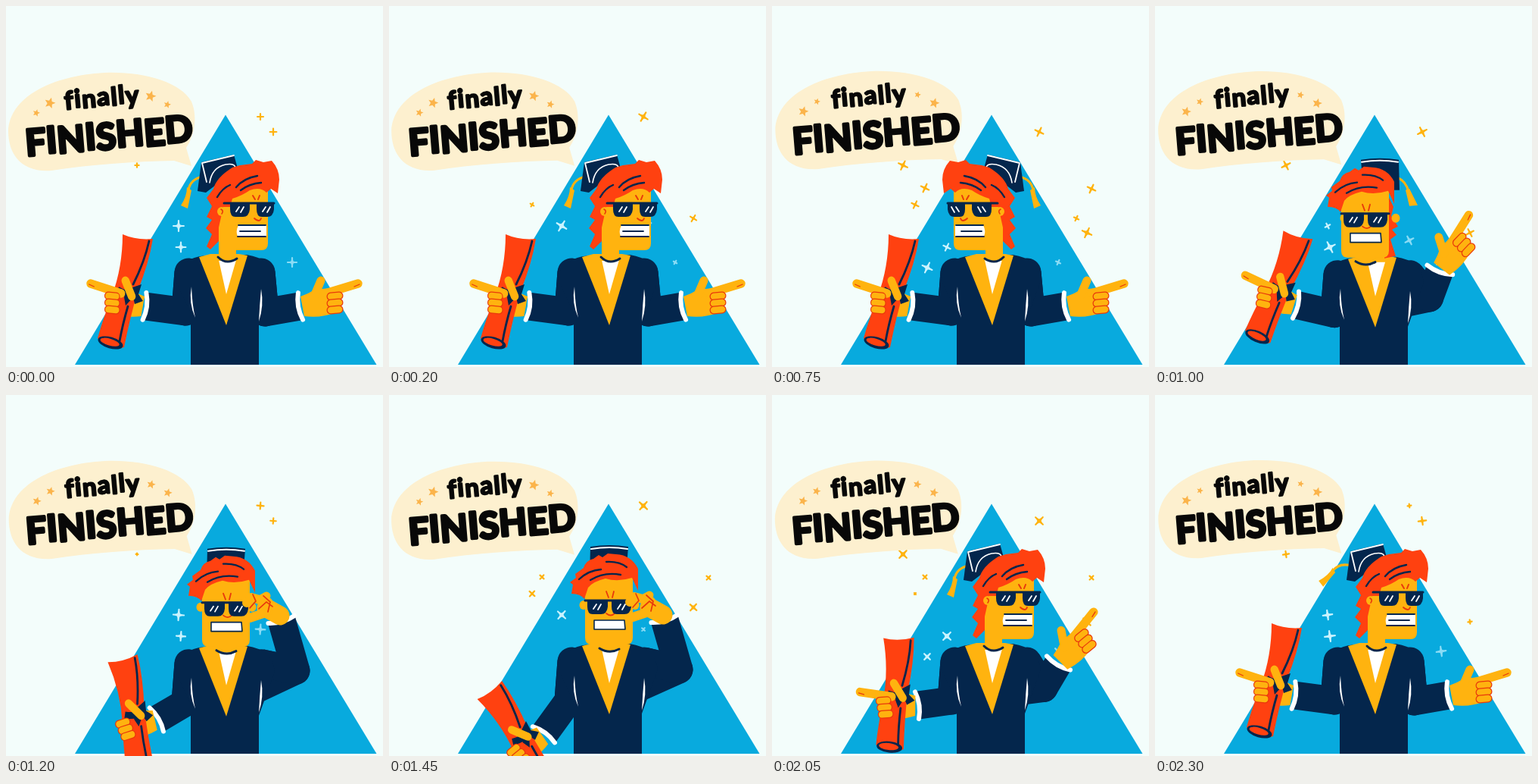
Write an HTML page with a canvas that moves like this. It is 498 px wide and 476 px high and loops after 2350 ms.

```html
<!DOCTYPE html>
<html lang="en">
<head>
<meta charset="utf-8">
<title>Finally finished</title>
<style>
  html, body { margin: 0; width: 498px; height: 476px; overflow: hidden; background: #f3fdfb; }
  canvas { display: block; }
</style>
</head>
<body>
<canvas id="stage" width="498" height="476"></canvas>
<script>
const ctx = document.getElementById('stage').getContext('2d');
const LOOP = 2350, STEP = 50, FLOOR = 473;
const PAPER = '#f3fdfb', BLUE = '#08aade', NAVY = '#04264c', YELLOW = '#ffb30f',
      RED = '#ff4110', DARK_RED = '#e8390c', WHITE = '#ffffff', CREAM = '#fdf0cf',
      STAR = '#fbb44b', INK = '#080808';

// x, y and the moment of greatest size within a half loop
const GOLD = [[336, 146, 280], [353, 166, 912], [422, 241, 575], [402, 280, 450],
              [416, 299, 800], [189, 262, 525], [202, 240, 575], [173, 210, 850]];
const BRIGHT = [[228, 290, 130], [231, 318, 1000], [205, 345, 640]];
const FAINT = [[378, 338, 1050], [341, 283, 300], [336, 309, 1125]];

const rad = deg => deg * Math.PI / 180;
const mix = (a, b, u) => a + (b - a) * u;
const mixPoint = (a, b, u) => [mix(a[0], b[0], u), mix(a[1], b[1], u)];
function ramp(t, from, to) {
  const u = Math.min(1, Math.max(0, (t - from) / (to - from)));
  return u * u * (3 - 2 * u);
}

function fill(d, color) { ctx.fillStyle = color; ctx.fill(new Path2D(d)); }
function line(d, color, width, cap = 'round') {
  ctx.strokeStyle = color; ctx.lineWidth = width; ctx.lineCap = cap; ctx.lineJoin = 'round';
  ctx.stroke(new Path2D(d));
}
function oval(x, y, rx, ry, color) {
  ctx.fillStyle = color; ctx.beginPath(); ctx.ellipse(x, y, rx, ry, 0, 0, 7); ctx.fill();
}
function group(x, y, angle, draw, flip = 1) {
  ctx.save(); ctx.translate(x, y); ctx.rotate(angle); ctx.scale(flip, 1); draw(); ctx.restore();
}

function star(x, y, r, points, inner, angle, color) {
  ctx.fillStyle = color;
  ctx.beginPath();
  for (let i = 0; i < points * 2; i++) {
    const a = angle + i * Math.PI / points, d = i % 2 ? r * inner : r;
    ctx.lineTo(x + d * Math.cos(a), y + d * Math.sin(a));
  }
  ctx.fill();
}

// Every sparkle swells and fades twice per loop while turning once.
function sparkles(list, t, color, size) {
  const period = LOOP / 2, reach = 360;
  for (const [x, y, peak] of list) {
    const away = Math.abs((t - peak + 2.5 * period) % period - period / 2);
    if (away >= reach) continue;
    const r = size * Math.sqrt(Math.cos(Math.PI / 2 * away / reach));
    group(x, y, 2 * Math.PI * t / LOOP, () => {
      line(`M${-r} 0H${r}M0 ${-r}V${r}`, color, 2.2);
      star(0, 0, r, 4, .38, 0, color);
    });
  }
}

function lettering(text, x, y, size, weight, gap, angle) {
  group(x, y, angle, () => {
    ctx.font = `700 ${size}px Lato, sans-serif`;
    ctx.fillStyle = ctx.strokeStyle = INK;
    ctx.lineWidth = weight;
    ctx.lineJoin = 'round';
    let pen = 0;
    [...text].forEach((c, i) => {
      const lift = i % 2 ? -.8 : .8;
      ctx.fillText(c, pen, lift);
      ctx.strokeText(c, pen, lift);
      pen += ctx.measureText(c).width + gap;
    });
  });
}

function bubble(t) {
  const sway = Math.cos(2 * Math.PI * t / 1600), k = (1 - sway) / 2;
  group(k * 1.4, -k * 2, 0, () => {
    fill('M3 165C5 120 60 92 130 88C182 86 230 100 245 126C254 148 248 172 238 187L245 211L222 204C170 205 110 209 60 217C20 220 3 195 3 165Z', CREAM);
    lettering('finally', 78, 136, 33, 2.4, 1.5, rad(-5));
    lettering('FINISHED', 27, 197, 48, 4, .2, rad(-4.7));
    for (const [x, y, grow] of [[58, 128, 1.5], [191, 119, 1.5], [40, 141, -1], [213, 130, -1]])
      star(x, y, 6 + grow * sway, 5, .45, -1.3, STAR);
  });
}

function sleeve(shoulder, armpit, elbow, wrist) {
  line(`M${shoulder}L${elbow}L${armpit}`, NAVY, 37);
  line(`M${shoulder}L${elbow}L${wrist}`, NAVY, 37, 'butt');
  const angle = Math.atan2(wrist[1] - elbow[1], wrist[0] - elbow[0]);
  group(...wrist, angle, () => line('M1 -18Q-5 0 1 18', WHITE, 6));
}

function body() {
  fill('M244 480V405L223 360Q226 333 264 329L318 328Q352 333 355 362L334 420V480Z', NAVY);
  fill('M255 331L270 327H308L319 329L291 421Z', YELLOW);
  fill('M281 335H304L291 380Z', WHITE);
  fill('M245 370Q246 395 250 411Q241 392 245 370Z', WHITE);
  fill('M337 373Q341 395 334 416Q335 394 337 373Z', WHITE);
}

function lens(x, y, w) {
  fill(`M${x} ${y}h${w}v9q-1 10 -9 10h${16 - w}q-7 0 -7 -10Z`, NAVY);
  line(`M${x + 8} ${y + 12}l4 -6M${x + 14} ${y + 13}l4 -7`, WHITE, 1.8);
}

function profile(swing) {
  group(259, 225, swing, () => {
    line('M0 0Q-16 4 -18 18', YELLOW, 3);
    fill('M-20 14L-14 18L-19 42L-28 38Q-20 26 -20 14Z', YELLOW);
  });
  fill('M258 206L301 196L306 214L264 246L253 244Z', NAVY);
  line('M259 207L301 197M259 207L265 232', WHITE, 1.8);
  line('M269 233Q272 213 290 209Q302 207 303 213', WHITE, 1.6);
  fill('M281 250V336H304V322H337Q346 322 346 313V240H295Z', YELLOW);
  line('M280 331Q291 342 305 333', NAVY, 3);
  fill('M265 253L274 241Q278 226 299 213L309 210L325 208L330 203L340 206L351 204Q361 215 361 229L359 247L350 241L344 246Q336 238 322 243Q312 250 299 254L296 265H287L281 292L281 310L270 321L265 317L272 301L264 293L272 282L265 278L272 264Z', RED);
  line('M304 239Q314 227 332 224M310 243Q322 234 337 233M279 252Q286 240 296 236', NAVY, 2.4);
  oval(285, 271, 6, 6, YELLOW);
  line('M284 268q4 2 1 6', DARK_RED, 1.6);
  line('M326 250l3 5M335 250l-2 5', DARK_RED, 2);
  line('M328 280q7 6 9 0', DARK_RED, 1.8);
  line('M288 260H354', NAVY, 3);
  lens(296, 259, 26);
  lens(331, 259, 23);
  fill('M307 289H344V304H306Q303 297 307 289Z', WHITE);
  line('M307 289H343M306 304H343M309 297H336', NAVY, 1.8);
}

function frontHead(turn) {
  const side = Math.sign(turn) || 1;
  group(291 - 6 * turn, 0, 0, () => {
    if (Math.abs(turn) > .3) {
      line('M24 224Q34 228 38 242', YELLOW, 3);
      fill('M34 240L39 238L50 260L39 261Z', YELLOW);
    }
    fill('M-25 200Q0 196 25 200L26 240H-22Z', NAVY);
    line('M-24 203Q0 199 24 203', WHITE, 2);
  }, -side);
  group(291 + 13 * turn, 0, 0, () => {
    if (Math.abs(turn) > .6)
      group(0, 0, 0, () => fill('M27 242L37 262L34 274L43 288L35 292L41 299L33 305L40 327L25 330Z', RED), -side);
    for (const x of [-34, 34]) oval(x - 6 * turn, 277, 5.5, 6, YELLOW);
    fill('M-32 240H31V320Q31 329 22 329H13V337H-13V329H-23Q-32 329 -32 320Z', YELLOW);
    line('M-13 334Q0 342 13 335', NAVY, 3);
    fill('M-50 262L-48 250L-52 247L-44 241L-45 236L-34 228Q-31 218 -21 216L-14 211L-9 214L-2 209L9 210Q29 211 38 229V258L30 241Q11 247 -5 242Q-22 246 -28 254L-33 269Q-38 262 -50 262Z', RED);
    line('M-40 243Q-27 231 -11 230M-25 244Q-7 233 15 237M-4 220Q13 219 23 227', NAVY, 2.3);
    line('M-4 259l3 8M6 259l-2 8', DARK_RED, 1.8);
    line('M-4 288q6 5 11 0', DARK_RED, 1.8);
    line('M-32 271H31', NAVY, 3);
    lens(-29, 270, 27);
    lens(3, 270, 26);
    fill('M-20 297H20L21 309H-20Z', WHITE);
    line('M-20 297H20L21 309H-20Z', NAVY, 1.6);
  });
}

function palm() { fill('M1 -13Q12 -17 20 -22L40 -24Q57 -8 47 8Q28 16 6 13Z', YELLOW); }

function fingers(pointing) {
  if (pointing) {
    line('M34 -17L77 -30', YELLOW, 11.5);
    line('M72 -26L79 -29', DARK_RED, 1.3);
  }
  line('M19 -13L28 -34', YELLOW, 11);
  for (const y of [-13, -4, 5]) {
    const finger = `M41 ${y}L52 ${y - 1}`;
    line(finger, DARK_RED, 11);
    line(finger, YELLOW, 8.5);
  }
}

function pinch() {
  line('M-2 -6L-20 -16', YELLOW, 25);
  line('M-18 -11L-42 -3', YELLOW, 12);
  line('M-18 -24L-40 -30L-46 -23', YELLOW, 12);
  line('M-29 -27L-20 -32', YELLOW, 11);
  line('M-38 -34l4 9l-8 9M-30 -15l10 -9l8 6M-24 -32l9 8l-3 13', DARK_RED, 1.7);
}

function scroll() {
  fill('M-30 -95Q-12 -87 10 -89Q5 -58 -10 -20Q-20 14 -28 54Q-50 61 -63 42Q-56 17 -44 -14Q-30 -52 -30 -95Z', RED);
  line('M5 -86Q-1 -59 -16 -29M-23 0Q-30 24 -34 46', NAVY, 2.8);
  group(-46, 48, rad(16), () => {
    oval(0, 0, 17, 7.5, NAVY);
    oval(-1, -.5, 13, 4.5, RED);
  });
  line('M-37 -22Q-24 -14 -15 -17', NAVY, 9, 'butt');
  fill('M-20 -24L-5 -29L-9 -16L-3 -7L-14 -3L-16 -12L-26 -1L-28 -12Z', NAVY);
}

function pose(t) {
  const raised = ramp(t, 850, 1150) - ramp(t, 1950, 2130);
  const lowered = ramp(t, 1050, 1300) - ramp(t, 1920, 2130);
  const windup = raised * (1 - lowered);
  const bob = 11 * Math.max(0, Math.cos(2 * Math.PI * (t - 400) / 700)) ** 3;
  const [lx, ly] = mixPoint([184, 396], [205, 447], lowered);
  const [rx, ry] = mixPoint([388, 396], [364, 296], raised);
  const [ex, ey] = mixPoint([342, 404], [383, 362], raised);
  return {
    bob,
    turn: 2 - 4 * ramp(t, 310, 520) + 2 * ramp(t, 880, 1120) + 2 * ramp(t, 1960, 2100),
    left: [lx + 6 * windup, ly - 12 * windup + bob * mix(1.6, .7, lowered)],
    tilt: 18 * windup - 45 * lowered - .6 * bob * (1 - lowered),
    right: [rx, ry + bob * mix(1.8, .35, raised)],
    elbow: [ex, ey + bob * mix(1, .5, raised)],
    aim: -82 * raised,
    gripping: raised > .85
  };
}

function draw(t) {
  const { bob, turn, left, tilt, right, elbow, aim, gripping } = pose(t);

  ctx.fillStyle = PAPER;
  ctx.fillRect(0, 0, 498, 476);
  fill(`M290 143.5L489.5 ${FLOOR}H91Z`, BLUE);
  sparkles(BRIGHT, t, '#c9f3ff', 7.5);
  sparkles(FAINT, t, '#8bdcf5', 6.5);
  sparkles(GOLD, t, YELLOW, 6.8);
  bubble(t);

  ctx.save();
  ctx.beginPath(); ctx.rect(0, 0, 498, FLOOR); ctx.clip();
  sleeve([241, 351 + bob], [262, 392 + bob], [237, 403 + bob], left);
  sleeve([337, 351 + bob], [316, 392 + bob], elbow, right);
  group(0, bob, 0, () => {
    body();
    if (Math.abs(turn) < 1.3) frontHead(turn);
    else if (turn > 0) profile(.5 * ramp(t, 2050, 2150));
    else group(586, 0, 0, () => profile(0), -1);
  });
  ctx.restore();

  group(...right, gripping ? 0 : rad(aim), () => {
    if (gripping) pinch();
    else { palm(); fingers(true); }
  });
  group(...left, rad(tilt), () => {
    group(0, 0, 0, palm, -.94);
    scroll();
    group(0, 0, 0, () => fingers(!gripping), -.94);
  });
}

function tick(now) {
  draw(Math.floor(now % LOOP / STEP) * STEP);
  requestAnimationFrame(tick);
}
requestAnimationFrame(tick);
</script>
</body>
</html>
```
